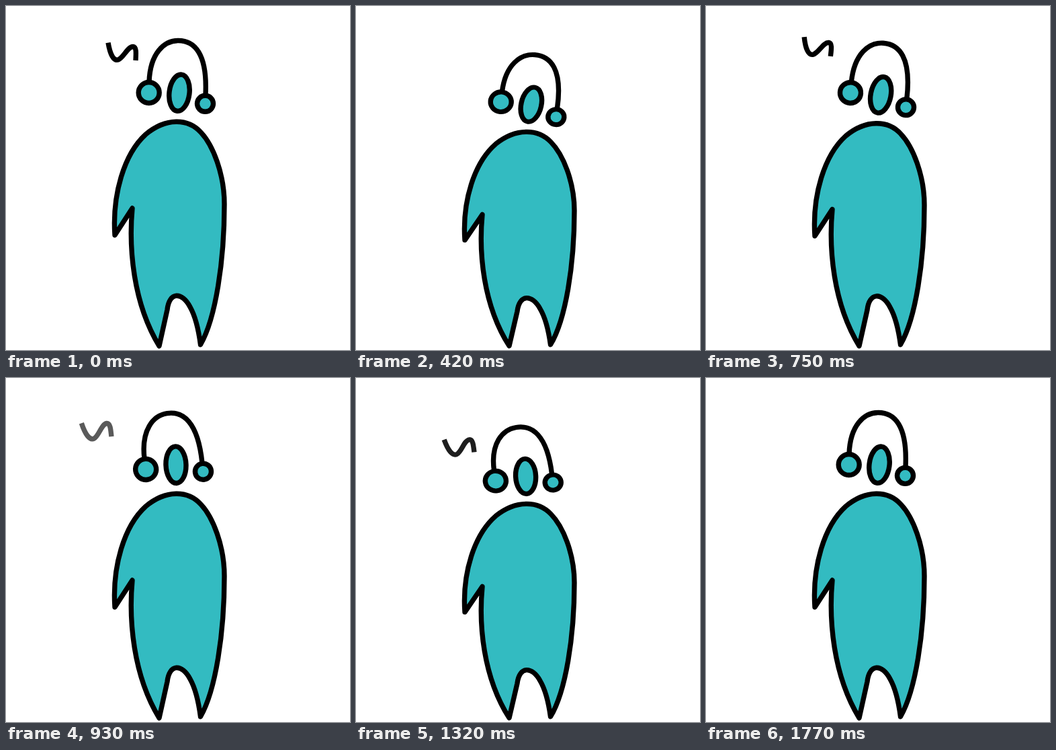
Write an HTML page that moves like this. It is 512x512 px and loops after 1.8 s.

```html
<!DOCTYPE html>
<html lang="en">
<head>
<meta charset="utf-8">
<title>Bobbing figure</title>
<style>
  html, body { margin: 0; width: 100%; height: 100%; overflow: hidden; background: #fff; }
  svg { display: block; width: 100vw; height: 100vh; }
  .ink { fill: #33bbc1; stroke: #000; stroke-width: 7.4; stroke-linejoin: round; stroke-linecap: round; }
  .line { fill: none; }
  #squiggle { stroke-linecap: butt; }
</style>
</head>
<body>
<svg viewBox="0 0 512 512">
  <g id="figure">
    <path class="ink" d="M162 341 L188 301 C182.5 360 189 442 228 506 L240 452 C243 425 262 425 274 448
      C283 464 287 485 289.5 504 C312 465 325 380 325 295 C325 250 308 207 290 188
      C271 167 238 166 208 191 C176 220 158 280 162 341 Z"/>
    <g id="head">
      <path class="ink line" d="M213 113 C214.5 70 235.5 51.5 256.5 51.5 C280 51.5 300 70 297 132"/>
      <circle class="ink" cx="212.7" cy="129" r="15.5"/>
      <circle class="ink" cx="296.5" cy="145.3" r="12"/>
      <ellipse class="ink" rx="15" ry="27.3" transform="translate(258 129.2) rotate(7)"/>
      <path id="squiggle" class="ink line" d="M152 54.5 C155 72 160 82 167 80 C175 77 181 60.5 189 60.5 C194.5 61 193.5 71 193 81"/>
    </g>
  </g>
</svg>
<script>
  const LOOP = 1800, STEP = 30, BOB = 900, GROUND = 506;
  const [figure, head, squiggle] = ['figure', 'head', 'squiggle'].map(id => document.getElementById(id));

  const SWING = 360;
  const swings = [
    { at: 0, turn: 5 },
    { at: 650, turn: -14.4 },
    { at: 1330, turn: 9.4 }
  ];

  // Each puff drifts away from the head and fades in and out
  const SPEED = 0.056, RISE = 240, FALL = 270;
  const puffs = [
    { from: 0, to: 350, opacity: 1 },
    { from: 510, to: 1105, opacity: 0 },
    { from: 1240, to: 1660, opacity: 0.55 }
  ];

  const clamp = u => Math.min(1, Math.max(0, u));
  const inOut = u => u < 0.5 ? 4 * u ** 3 : 1 - 4 * (1 - u) ** 3;

  function squash(t) {
    const u = ((t - 6 + BOB) % BOB) / (BOB / 2);
    return 1 - 0.0455 * inOut(u < 1 ? u : 2 - u);
  }

  function tilt(t) {
    return swings.reduce((sum, { at, turn }) => sum + turn * inOut(clamp((t - at) / SWING)), 0);
  }

  function drawPuff(t) {
    const puff = puffs.find(p => t >= p.from && t < p.to);
    squiggle.setAttribute('visibility', puff ? 'visible' : 'hidden');
    if (!puff) return;
    const age = t - puff.from, d = SPEED * age;
    squiggle.setAttribute('transform', `translate(${-d} ${-d * 0.34})`);
    squiggle.setAttribute('opacity', Math.min(1, puff.opacity + age / RISE, (puff.to - t) / FALL));
  }

  function draw(t) {
    const s = squash(t);
    figure.setAttribute('transform', `translate(0 ${GROUND * (1 - s)}) scale(1 ${s})`);
    head.setAttribute('transform', `rotate(${tilt(t)} 255.5 162)`);
    drawPuff(t);
  }

  const start = performance.now();
  function tick() {
    const t = (performance.now() - start) % LOOP;
    draw(Math.floor(t / STEP) * STEP);
    requestAnimationFrame(tick);
  }
  tick();
</script>
</body>
</html>
```
